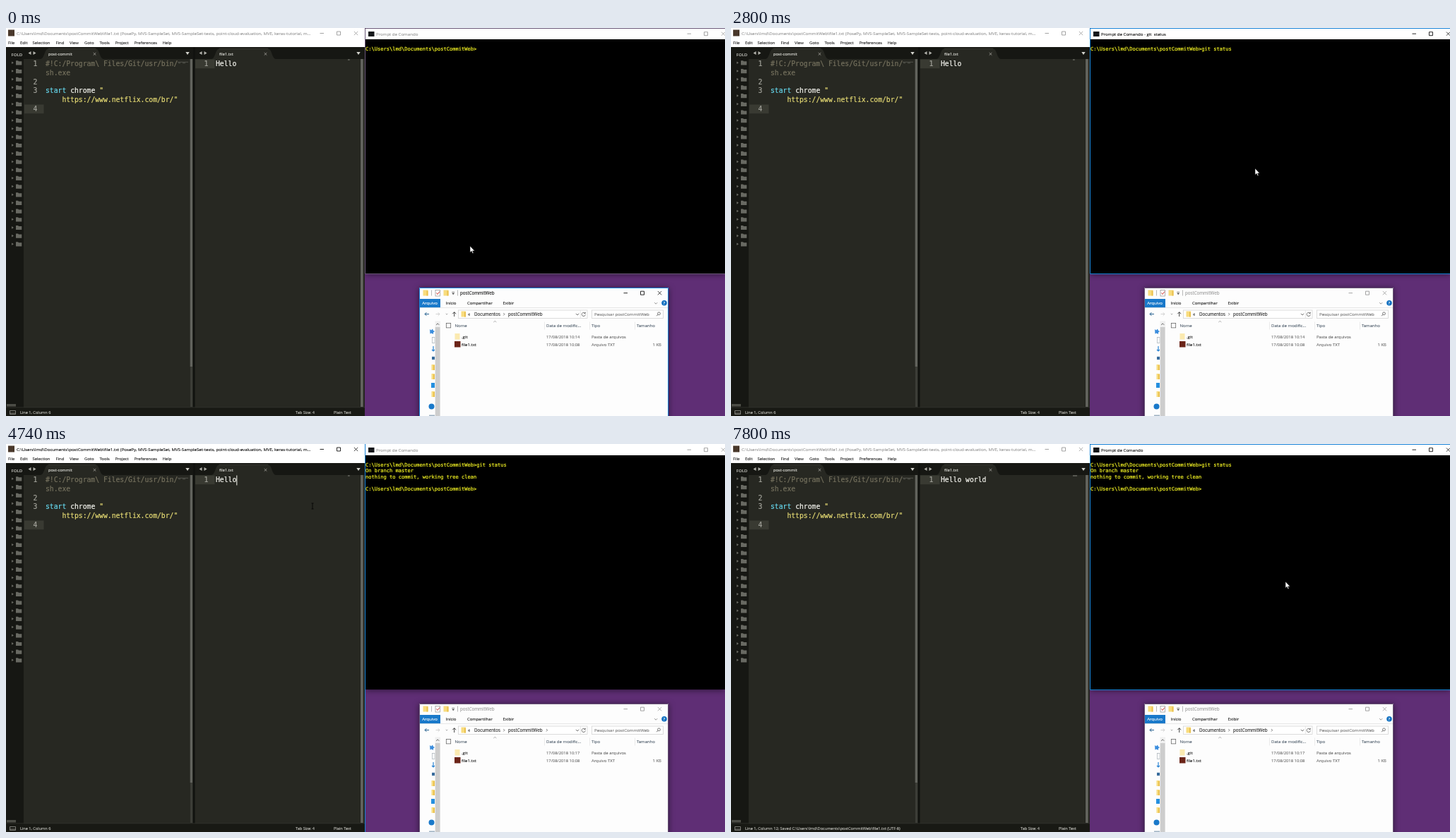
An HTML page that plays this animation: 1018x550 px, repeating every 8 s.

```html
<!DOCTYPE html>
<html lang="pt-BR">
<head>
<meta charset="utf-8">
<title>Post-commit demo</title>
<style>
  html, body { margin: 0; width: 100%; height: 100%; overflow: hidden; background: #000; }
  svg { display: block; width: 100%; height: 100%; }
  text { font-family: "Open Sans", "Noto Sans", sans-serif; white-space: pre; stroke-width: .12px; }
  .mono text { font-family: "DejaVu Sans Mono", "Liberation Mono", monospace; stroke-width: .2px; }
  .shadow { filter: drop-shadow(0 1px 4px #0008); }
</style>
</head>
<body>
<svg id="stage" viewBox="0 0 1018 550" xmlns="http://www.w3.org/2000/svg"></svg>
<script>
const LOOP = 8000;
const HOME = 'C:\\Users\\lmd\\Documents\\postCommitWeb';
const PROMPT = HOME + '>';
const PROJECTS = '(PosePy, MVS-SampleSet, MVS-SampleSet-tests, point-cloud-evaluation, MVE, keras-tutorial, ';
const CODE = 9.73, CODE_W = CODE * 0.602;
const TERM = 7.07, TERM_W = TERM * 0.602;
const BLUE = '#1883d7', IDLE = '#6b5878', BG = '#272822', DARK = '#161713';

// Drawing helpers
const rect = (x, y, w, h, fill, more = '') =>
  `<rect x="${x}" y="${y}" width="${w}" height="${h}" fill="${fill}" ${more}/>`;
const text = (x, y, str, fill = '#222', size = 6.05, more = '') =>
  `<text x="${x}" y="${y}" fill="${fill}" stroke="${fill}" font-size="${size}" ${more}>${str}</text>`;
const path = (d, stroke, width = 0.8, more = '') =>
  `<path d="${d}" fill="none" stroke="${stroke}" stroke-width="${width}" ${more}/>`;
const shape = (d, fill, more = '') => `<path d="${d}" fill="${fill}" ${more}/>`;
const group = (id, body, more = '') => `<g id="${id}" ${more}>${body}</g>`;
const cross = (x, y, r, color, width) =>
  path(`M${x - r} ${y - r}l${2 * r} ${2 * r}m0 ${-2 * r}l${-2 * r} ${2 * r}`, color, width);
const buttons = (x, y) =>
  path(`M${x - 2.5} ${y}h5.5M${x + 21.5} ${y - 2.5}h5v5h-5z`, 'currentColor', 0.9) +
  cross(x + 48.5, y, 2.6, 'currentColor', 0.8);
const folder = (x, y, w = 7, h = 8) =>
  rect(x, y, w, h, '#f8dc7e') + rect(x + w - 2, y + 1, 2, h - 1, '#e9c04f');

function editorTab(x, w, label) {
  return shape(`M${x} 44C${x + 6} 43 ${x + 5} 29 ${x + 12} 29H${x + w - 12}C${x + w - 5} 29 ${x + w - 6} 43 ${x + w} 44Z`, BG) +
    path(`M${x + 11} 29.3H${x + w - 11}`, '#45463f', 0.6) +
    text(x + 11, 38.7, label, '#e4e4de', 5.7);
}

function paneHead(x, menuX) {
  return shape(`M${x + 4} 33v5l-4-2.5zM${x + 7} 33v5l4-2.5z`, '#b4b4ae') +
    shape(`M${menuX - 2.7} 34h5.4l-2.7 4z`, '#d4d4ce');
}

function sidebar() {
  let rows = '';
  for (let i = 0; i < 23; i++) {
    const y = 49.3 + i * 11.68;
    rows += shape(`M8 ${y - 1.8}v3.6l3-1.8z`, '#65665f') +
      shape(`M14 ${y - 3}h3l1 1h4.3v5.2h-8.3z`, '#686962');
  }
  return rect(0, 27, 25, 511, DARK) + text(7.5, 40.3, 'FOLD', '#c2c2bc', 6.1, 'font-weight="600"') +
    rows + rect(1, 533, 13, 3.5, '#4c4d46');
}

function editor() {
  const menu = [[3, 'File'], [20, 'Edit'], [37.5, 'Selection'], [70.5, 'Find'], [90, 'View'], [111, 'Goto'],
    [132.5, 'Tools'], [154.5, 'Project'], [181.5, 'Preferences'], [221.5, 'Help']];
  const numbers = [[1, 54], [2, 79.5], [3, 92.3], [4, 118]];
  const code = (x, y, str, color) => text(x, y, str, color, CODE);
  return rect(0, 0, 508, 27, '#fff') + rect(3, 2.5, 9, 9, '#49382b') +
    group('editorChrome', text(15, 10, '', 'currentColor', 6.1, 'id="editorTitle"') + buttons(447, 7.5)) +
    menu.map(([x, label]) => text(x, 23, label, '#222', 5.9)).join('') +
    rect(0, 27, 508, 523, BG) + rect(0, 27, 508, 17, DARK) + sidebar() +
    paneHead(31.5, 257) + paneHead(273.5, 499) +
    editorTab(49, 89, 'post-commit') + editorTab(291, 91, 'file1.txt') +
    cross(125.5, 36.8, 1.8, '#aaa9a3', 0.8) +
    group('tabClose', cross(367.5, 36.8, 1.8, '#aaa9a3', 0.8)) +
    '<circle id="tabDot" cx="367.5" cy="37" r="2" fill="#a6a69f"/>' +
    rect(26, 108.5, 27.5, 12.7, '#393a32') + rect(268, 44.5, 27.5, 12.7, '#393a32') +
    group('code',
      numbers.map(([n, y]) => code(38.5, y, String(n), '#a3a39b')).join('') + code(280.5, 54, '1', '#a3a39b') +
      code(56, 54, '#!C:/Program\\ Files/Git/usr/bin/', '#75715e') + code(56, 67, 'sh.exe', '#75715e') +
      code(56, 92.3, 'start', '#66d9ef') + code(56 + 6 * CODE_W, 92.3, 'chrome', '#f8f8f2') +
      code(56 + 13 * CODE_W, 92.3, '"', '#e6db74') +
      code(56 + 4 * CODE_W, 105, 'https://www.netflix.com/br/"', '#e6db74') +
      text(297, 54, '', '#f8f8f2', CODE, 'id="fileText"'), 'class="mono"') +
    rect(0, 44.5, 1, 14, '#f8f8f0', 'id="caret"') +
    path('M243 48.3H258M244 49.7h3M250 49.7h4', '#65665f', 0.7) +
    rect(484, 44.5, 3, 1, '#85867f', 'id="minimap"') +
    rect(260, 44, 5, 494, '#22231e') + rect(260.7, 44, 3.3, 493, '#3c3d37') + rect(260.7, 44, 3.3, 436, '#62635d') +
    rect(265, 27, 2.5, 511, '#11120f') +
    rect(501, 44, 6, 494, '#22231e') + rect(502, 44, 3.8, 493, '#62635d') +
    rect(0, 538, 508, 12, '#181914') + rect(0, 537.5, 508, 0.7, '#33342e') +
    path('M5.5 542.5h8v5h-8zM5.5 546h8', '#a4a49e', 0.7) +
    text(20, 547.3, '', '#c8c8c2', 5.6, 'id="status"') +
    text(410, 547.3, 'Tab Size: 4', '#c8c8c2', 5.6) + text(464, 547.3, 'Plain Text', '#c8c8c2', 5.6) +
    path('M508.5 0V550', BLUE, 1, 'id="editorFrame"');
}

function terminal() {
  const rows = [['promptLine', 32.2], ['out1', 40.4], ['out2', 48.9], ['out3', 65.7]];
  return rect(509, 0, 509, 348, '#000', 'class="shadow"') + rect(509, 0, 509, 16, '#fff') +
    rect(513, 5, 8.5, 7, '#15171a') +
    group('terminalChrome', text(524, 10.8, '', 'currentColor', 6.1, 'id="terminalTitle"') + buttons(967, 8.2)) +
    group('terminalText', rows.map(([id, y]) => text(509, y, '', '#f2f224', TERM, `id="${id}"`)).join(''), 'class="mono"') +
    rect(0, 0, TERM_W, 1.2, '#f2f224', 'id="block"') +
    path('M1018 .5H508.5V348.5H1018', BLUE, 1, 'id="terminalFrame"');
}

function navIcons() {
  return shape('M600 427l2 1.5 2-2 1 2.5 2 1-2 1.5v2.5l-2.5-1.5-2 1z', '#3a8ddd') +
    rect(603.5, 438.5, 3.5, 8, '#fff', 'stroke="#a5aeb5" stroke-width=".7"') +
    path('M605 451v7m-2-2l2 2 2-2', '#2c85d4', 1.2) +
    rect(603, 464.5, 4, 7, '#e4ecf3') + rect(603, 466, 4, 4, '#386b9c') +
    folder(602.5, 477, 4.5, 8) + folder(602.5, 490, 4.5, 8) + rect(602, 503, 5, 7, '#2590df') +
    folder(602.5, 515, 4.5, 8) + '<circle cx="602.5" cy="536.5" r="4" fill="#1979ca"/>' + rect(599, 548.5, 8, 1.5, '#9fb2c2');
}

function explorer() {
  const GREY = '#6d6d6d', HEAD = '#53616f';
  const fileRow = (y, name, dateId, kind) =>
    text(645, y, name) + text(765, y, '', GREY, 5.85, `id="${dateId}"`) + text(829, y, kind, GREY, 5.95);
  return rect(585, 368, 353, 190, '#fdfdfd', 'class="shadow"') +
    folder(590.5, 371.5) + path('M602.5 371.5v8M639.5 371.5v8', '#9a9a9a', 0.7) +
    rect(608, 371.5, 6.5, 8.5, '#fff', 'stroke="#8d8d8d" stroke-width=".7"') + path('M609.5 375.5l1.5 2 3-4', '#d1423c', 1) +
    folder(619.5, 371.5) + shape('M631.2 375.8h4l-2 2.3z', '#444') + path('M631.2 374.3h4', '#444', 0.6) +
    group('explorerChrome', text(643, 378, 'postCommitWeb', 'currentColor', 6.2) + buttons(877, 375.7)) +
    rect(585, 384, 30, 12.3, '#1979ca') + text(589.2, 392.3, 'Arquivo', '#fff') +
    text(622.5, 392.3, 'Início') + text(653, 392.3, 'Compartilhar', '#222', 5.8) + text(703.5, 392.3, 'Exibir') +
    path('M918.2 389.2l2 2 2-2', '#777', 0.8) + '<circle cx="932" cy="389.8" r="3.8" fill="#0f6fc0"/>' +
    text(930.6, 392.1, '?', '#fff', 6, 'font-weight="600"') + rect(585, 396.3, 353, 0.7, '#dfdfdf') +
    path('M599 405.5h-6m2.5-2.5l-2.5 2.5 2.5 2.5', '#2a6391', 1) +
    path('M608.5 405.5h5.5m-2.3-2.3l2.3 2.3-2.3 2.3', '#ccc', 0.9) + path('M622.7 405l1.3 1.2 1.3-1.2', '#777', 0.7) +
    path('M634.7 409v-6.3m-2.5 2.5l2.5-2.5 2.5 2.5', '#444', 1) +
    rect(640.5, 400, 182.5, 11.5, '#fff', 'stroke="#d4d4d4" stroke-width=".8"') + path('M813.3 400v11.5', '#ddd', 0.7) +
    folder(644.5, 401.5, 6.5, 8) + text(654, 407.6, '«', '#333', 6.5) + text(663, 407.7, 'Documentos', '#222', 6.2) +
    path('M704.3 404l1.6 1.7-1.6 1.7', '#555', 0.8) + text(711, 407.7, 'postCommitWeb', '#222', 6.2) +
    path('M765 404l1.6 1.7-1.6 1.7', '#555', 0.8, 'id="crumb"') +
    path('M806.8 404.8l2.2 2.2 2.2-2.2', '#555', 0.8) + path('M819.8 404.2a2.6 2.6 0 1 0 .6 2M820.3 402.7v1.8h-2', '#555', 0.8) +
    rect(829.5, 400, 101, 11.5, '#fff', 'stroke="#d4d4d4" stroke-width=".8"') +
    text(833, 407.7, 'Pesquisar postCommitWeb', '#777', 6.15) +
    '<circle cx="924.5" cy="404.8" r="1.9" fill="none" stroke="#555" stroke-width=".8"/>' + path('M923.1 406.2l-2 2', '#555', 0.9) +
    rect(623.3, 418.5, 6.4, 6.4, '#fff', 'stroke="#555" stroke-width=".7"') + path('M690.3 417l2-1.6 2 1.6', '#777', 0.6) +
    path('M762.5 416.5v11M826.5 416.5v11M890.5 416.5v11', '#e3e3e3', 0.7) +
    text(635.5, 424.2, 'Nome', HEAD) + text(765, 424.2, 'Data de modific...', HEAD) +
    text(829, 424.2, 'Tipo', HEAD) + text(893, 424.2, 'Tamanho', HEAD, 5.95) +
    rect(635.5, 433, 7, 8.5, '#fbeab0') + fileRow(439.6, '.git', 'gitDate', 'Pasta de arquivos') +
    rect(635, 444, 8.5, 8.5, '#6b2418') + fileRow(450.6, 'file1.txt', 'fileDate', 'Arquivo TXT') +
    text(915.5, 450.6, '1 KB', GREY, 5.9) +
    navIcons() + rect(607.5, 415.5, 7.5, 134.5, '#f0f0f0') + rect(607.8, 424, 6.7, 126, '#cdcdcd') +
    path('M609.2 420.8l2-2 2 2', '#555', 0.9) +
    path('M585.5 550V368.5H937.5V550', BLUE, 1, 'id="explorerFrame"');
}

const stage = document.getElementById('stage');
stage.innerHTML =
  rect(508, 348, 510, 202, '#5f2e75') + explorer() + terminal() + editor() +
  group('arrow', shape('M0 0V9.2L2.1 7.3 3.6 10.6 5 10 3.6 6.9H6.5Z', '#fff', 'stroke="#000" stroke-width=".5"')) +
  group('beam', path('M-1.5 -4h3M0 -4V4M-1.5 4h3', '#050505', 0.9));

const el = {};
stage.querySelectorAll('[id]').forEach(node => el[node.id] = node);
const show = (node, on) => node.setAttribute('visibility', on ? 'visible' : 'hidden');
const put = (node, str) => { if (node.textContent !== str) node.textContent = str; };
const latest = (steps, t) => steps.reduce((value, [at, next]) => t >= at ? next : value, steps[0][1]);

// Timelines: [start ms, value]
const ACTIVE = [[0, 'explorer'], [270, 'terminal'], [4430, 'editor'], [7740, 'terminal']];
const COMMAND = [[0, 0], [1500, 1], [1610, 2], [1700, 3], [1800, 4], [2140, 5], [2200, 6], [2270, 7],
  [2340, 8], [2430, 9], [2500, 10]];
const BLOCK = [[0, false], [370, true], [900, false], [1400, true], [1900, false], [2140, true],
  [2800, false], [2940, true], [3540, false]];
const FILE = [[0, 5], [5170, 6], [5770, 7], [5940, 8], [6050, 9], [6160, 10], [6270, 11]];
// The caret is solid from each wake until its fade begins
const WAKES = [4470, 5170, 5770];
const FADES = [4720, 5480, 6550];
// Pointer moves: start, end, from x, y, to x, y
const MOVES = [[40, 270, 657, 309, 742, 199], [3770, 4400, 742, 199, 434, 88], [7180, 7720, 434, 88, 785, 195]];

function pointer(t) {
  let [, , x, y] = MOVES[0];
  for (const [start, end, x0, y0, x1, y1] of MOVES) {
    if (t < start) break;
    const p = Math.min(1, (t - start) / (end - start)), e = p * p * (3 - 2 * p);
    x = x0 + (x1 - x0) * e;
    y = y0 + (y1 - y0) * e;
  }
  return [x, y];
}

function caretOpacity(t) {
  const i = WAKES.findLastIndex(wake => t >= wake);
  if (i < 0) return 0;
  const step = Math.floor((t - FADES[i]) / 45);
  return Math.max(0, Math.min(1, 1 - step / 6));
}

function render(t) {
  const active = latest(ACTIVE, t);
  for (const name of ['editor', 'terminal', 'explorer']) {
    el[name + 'Chrome'].style.color = name === active ? '#111' : '#999';
    el[name + 'Frame'].setAttribute('stroke', name === active ? BLUE : IDLE);
  }
  show(el.editorFrame, active === 'editor');
  show(el.terminalFrame, active !== 'editor');

  const done = t >= 2860, running = t >= 2800 && t < 2940;
  put(el.terminalTitle, 'Prompt de Comando' + (running ? ' - git  status' : ''));
  const typed = latest(COMMAND, t);
  put(el.promptLine, PROMPT + 'git status'.slice(0, typed));
  put(el.out1, done ? 'On branch master' : '');
  put(el.out2, done ? 'nothing to commit, working tree clean' : '');
  put(el.out3, t >= 2940 ? PROMPT : '');
  const column = PROMPT.length + (done ? 0 : typed);
  el.block.setAttribute('x', 509 + column * TERM_W);
  el.block.setAttribute('y', done ? 66 : 32.5);
  show(el.block, latest(BLOCK, t));

  const length = latest(FILE, t);
  const unsaved = t >= 5170 && t < 7100, saved = t >= 7140;
  const dot = t >= 5170 && !saved;
  put(el.fileText, 'Hello world'.slice(0, length));
  put(el.editorTitle, HOME + '\\file1.txt ' + (unsaved ? '• ' : '') + PROJECTS + (unsaved ? '...' : 'm...'));
  put(el.status, `Line 1, Column ${length + 1}` + (saved ? `; Saved ${HOME}\\file1.txt (UTF-8)` : ''));
  show(el.tabDot, dot);
  show(el.tabClose, !dot);
  el.minimap.setAttribute('width', length * 0.55);
  el.caret.setAttribute('x', 297 + length * CODE_W);
  el.caret.setAttribute('opacity', active === 'editor' ? caretOpacity(t) : 0);

  const refreshed = t >= 3870;
  put(el.gitDate, refreshed ? '17/08/2018 10:17' : '17/08/2018 10:14');
  put(el.fileDate, '17/08/2018 10:08');
  show(el.crumb, refreshed);

  const [x, y] = pointer(t), overText = x < 508;
  show(el.arrow, !overText);
  show(el.beam, overText);
  (overText ? el.beam : el.arrow).setAttribute('transform', `translate(${x} ${y})`);
}

function tick() {
  render(performance.now() % LOOP);
  requestAnimationFrame(tick);
}
tick();
</script>
</body>
</html>
```
